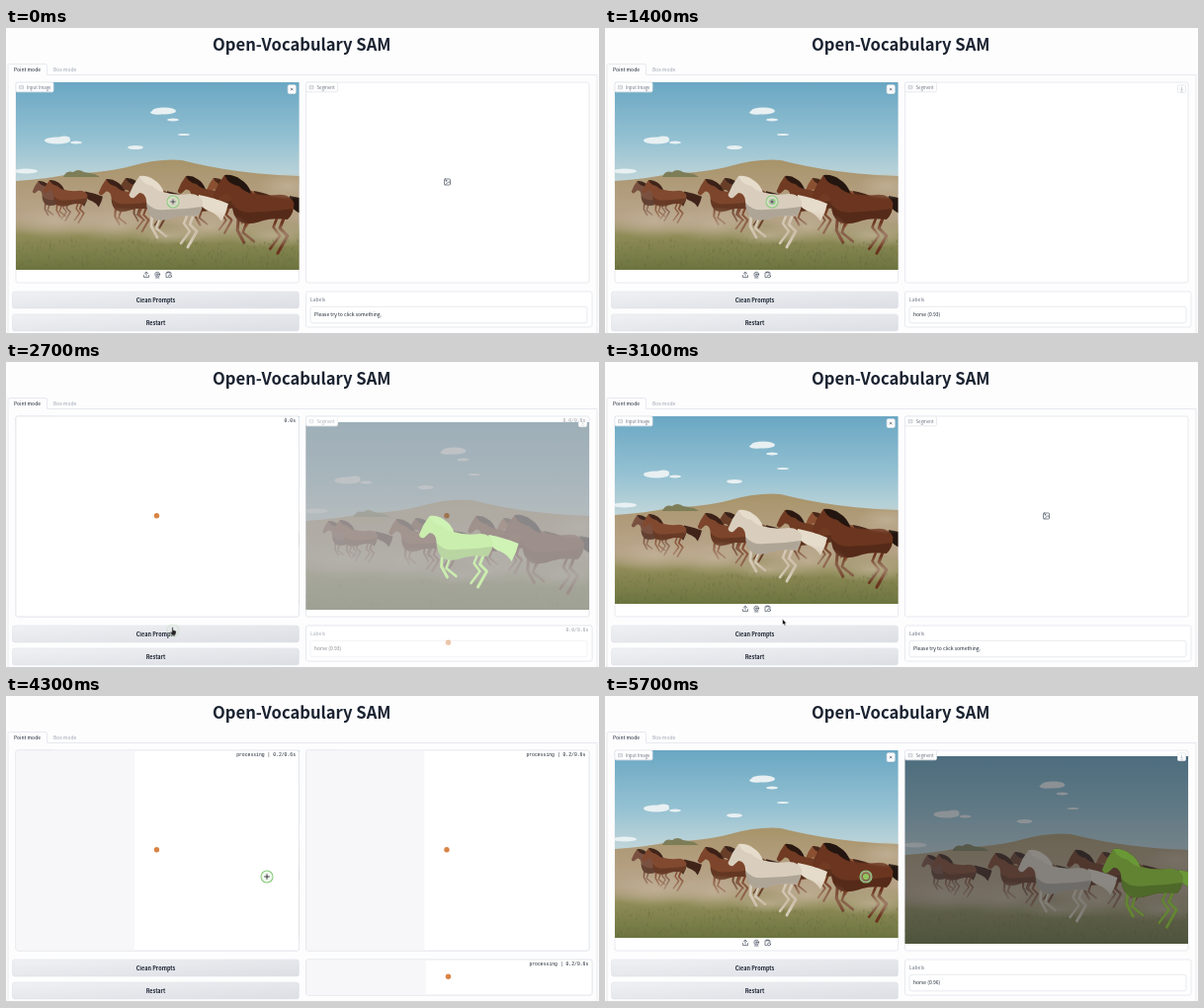
An HTML page for the animation above (5800 ms loop, 600 by 310 pixels).

```html
<!DOCTYPE html>
<html lang="en">
<head>
<meta charset="utf-8">
<title>Open-Vocabulary SAM</title>
<style>
  html, body { margin: 0; width: 100%; height: 100%; overflow: hidden; background: #fdfdfe; }
  svg { display: block; }
  text { font: 5px "Noto Sans CJK JP", "Noto Sans CJK SC", "Open Sans", sans-serif; fill: #1a2230; }
  .title { font-size: 16.6px; font-weight: 700; text-anchor: middle; }
  .button { font-size: 5.5px; font-weight: 600; text-anchor: middle; }
  .chip { font-size: 4.4px; fill: #6b7280; }
  .muted { fill: #9ca3af; }
  .timer { font: 4.76px "Liberation Mono", "DejaVu Sans Mono", monospace; text-anchor: end; }
  .box { fill: #fff; stroke: #e3e5ea; stroke-width: .8; }
  .icon { fill: none; stroke: #4b5563; stroke-width: .7; stroke-linecap: round; stroke-linejoin: round; }
  .pale { stroke: #a3a8b2; stroke-width: .5; }
  .limb { fill: none; stroke: currentColor; stroke-linecap: round; stroke-linejoin: round; }
  #label { font-weight: 500; }
  #clouds { filter: blur(.7px); }
</style>
</head>
<body>
<svg id="stage" width="600" height="310" viewBox="0 0 600 310">
  <defs>
    <linearGradient id="sky" x2="0" y2="1">
      <stop stop-color="#6aa7c3"/><stop offset=".55" stop-color="#94c1d2"/><stop offset="1" stop-color="#c6d8da"/>
    </linearGradient>
    <linearGradient id="hill" x2="0" y2="1">
      <stop stop-color="#a8946a"/><stop offset=".4" stop-color="#b5a184"/><stop offset="1" stop-color="#b8a68f"/>
    </linearGradient>
    <linearGradient id="grass" x2="0" y2="1">
      <stop stop-color="#aa9d78" stop-opacity="0"/><stop offset=".35" stop-color="#908c58"/>
      <stop offset="1" stop-color="#6c743e"/>
    </linearGradient>
    <linearGradient id="face" x2="1" y2="1">
      <stop stop-color="#f0f1f4"/><stop offset="1" stop-color="#dcdee4"/>
    </linearGradient>
    <radialGradient id="dust">
      <stop stop-color="#c4b39b" stop-opacity=".75"/><stop offset="1" stop-color="#c4b39b" stop-opacity="0"/>
    </radialGradient>
    <clipPath id="frame"><rect x="10" y="55" width="286.5" height="190"/></clipPath>

    <g id="horse">
      <path d="M195 169Q211 172 225 178Q223 187 218 196Q214 189 207 186Q200 184 195 177Z" fill="var(--mane)"/>
      <path class="limb" stroke-width="2.8" d="M148 189L147 201L153 212M191 186L186 199L193 206L184 222"/>
      <path class="limb" stroke-width="2.3" d="M156 191L152 203L162 211M184 188L180 198L186 206L177 218"/>
      <path fill="currentColor" d="M124.5 169L129 159L135 150L139 153Q152 157 158 166Q172 170 186 168Q196 168 199 176Q199 186 193 191Q180 189 170 192Q157 197 149 193Q142 188 142 175Q141 167 135 167L129.5 172Q126 173 124.5 169Z"/>
      <path opacity=".2" d="M142 177Q150 186 162 184Q180 184 198 181Q198 187 193 191Q180 189 170 192Q157 197 149 193Q142 188 142 177Z"/>
      <path fill="var(--mane)" d="M135 150Q143 149 150 154Q157 158 160 167Q153 165 148 160Q142 159 138 155Z"/>
    </g>

    <g id="photo" clip-path="url(#frame)">
      <rect x="10" y="55" width="287" height="105" fill="url(#sky)"/>
      <g id="clouds" fill="#e8f0f2"></g>
      <path d="M10 155Q42 153 64 148Q104 146 126 140Q155 132 178 134Q205 141 235 145T297 150V245H10Z" fill="url(#hill)"/>
      <path d="M58 151Q61 144 68 146Q73 142 79 146L90 148L95 151Z" fill="#7d7d58"/>
      <rect x="10" y="190" width="287" height="55" fill="url(#grass)"/>
      <g id="herd"></g>
      <g id="dusts" fill="url(#dust)"></g>
      <path id="blades" fill="none" stroke="#565f33" stroke-width=".6" opacity=".4"/>
    </g>
  </defs>

  <rect width="600" height="310" fill="#fdfdfe"/>
  <text class="title" x="299.3" y="22.5">Open-Vocabulary SAM</text>
  <path d="M2 310V38Q2 36.5 3.5 36.5H40Q41.5 36.5 41.5 38V47.5H598V310" fill="none" stroke="#e3e5ea" stroke-width=".8"/>
  <text x="8" y="43.6">Point mode</text>
  <text class="muted" x="48" y="43.6">Box mode</text>

  <!-- input panel -->
  <rect class="box" x="10" y="55" width="286.5" height="203" rx="2"/>
  <use href="#photo"/>
  <circle id="dot" r="3.1"/>
  <g class="icon">
    <path d="M139.5 250.5V252.5H144.5V250.5M142 251V247.3M140.4 248.8L142 247.2L143.6 248.8"/>
    <circle cx="153.2" cy="249.6" r="2.4"/><circle cx="153.2" cy="249.6" r=".9"/><path d="M151.5 253H155"/>
    <path d="M164 252.6H162V247.8H167V249.4M163.4 247.8V247H165.6V247.8"/><circle cx="166" cy="251.4" r="1.5"/>
  </g>
  <rect class="box" x="285.2" y="57.8" width="8" height="8.6" rx="1.3"/>
  <path class="icon" stroke-width=".5" d="M288.2 61.1L290.2 63.1M290.2 61.1L288.2 63.1"/>
  <g id="inputChip"></g>

  <!-- segment panel -->
  <rect class="box" x="303.5" y="55" width="286.5" height="203" rx="2"/>
  <g id="empty" class="icon">
    <rect x="443.5" y="153" width="6" height="6" rx=".8"/><circle cx="445.3" cy="154.8" r=".5"/>
    <path d="M444.5 158.8L448 155.7L449.4 157"/>
  </g>
  <g id="result" transform="translate(293.5 6)">
    <use href="#photo"/>
    <rect x="10" y="55" width="286.5" height="190" fill="#30343a" opacity=".5"/>
    <g id="masks" clip-path="url(#frame)"></g>
  </g>
  <g id="segmentChip"></g>
  <g id="download">
    <rect class="box" x="579.5" y="57.8" width="8" height="7.8" rx="1.3"/>
    <path class="icon pale" d="M583.5 60V62.8M582.5 62L583.5 63L584.5 62M582.2 64.2H584.8"/>
  </g>

  <!-- labels -->
  <rect class="box" x="303.5" y="267" width="289.5" height="36" rx="2"/>
  <text class="chip" x="308" y="277.2" style="font-size:5px">Labels</text>
  <rect class="box" x="308" y="282.3" width="280" height="16.5" rx="2"/>
  <text id="label" x="312" y="292.3"></text>

  <g id="covers"></g>

  <g fill="url(#face)" stroke="#e0e2e7" stroke-width=".6">
    <rect x="6.5" y="267" width="290" height="17" rx="2.6"/>
    <rect x="6.5" y="290" width="290" height="17" rx="2.6"/>
  </g>
  <text class="button" x="151.5" y="277.8">Clean Prompts</text>
  <text class="button" x="151.5" y="300.8">Restart</text>
  <rect y="309" width="600" height="1" fill="#d2d3d6"/>

  <g id="cursor">
    <g id="ring">
      <circle r="6" fill="#c9edc2" fill-opacity=".25" stroke="#8ccb80" stroke-width="1.1"/>
      <circle r="4.9" fill="none" stroke="#e4f6df" stroke-opacity=".6" stroke-width=".7"/>
    </g>
    <g id="cross" fill="none">
      <path d="M-3 0H3M0 -3V3" stroke="#fff" stroke-width="2"/>
      <path d="M-2.8 0H2.8M0 -2.8V2.8" stroke="#222" stroke-width=".9"/>
    </g>
    <path id="arrow" d="M-.8 -1V5L.6 3.8L1.6 6L2.6 5.5L1.7 3.4H3.4Z" fill="#111" stroke="#fff" stroke-width=".5"/>
    <path id="hand" d="M-1.2 -3Q-.4 -3.8 .2 -3V-.5L3 .3Q3.6 .8 3 3L2.3 5H-.9L-3 1.8Q-2.8 .8 -1.2 1.8Z" fill="#222" stroke="#fff" stroke-width=".5"/>
  </g>
</svg>

<script>
const LOOP = 5800;
const $ = id => document.getElementById(id);
const clamp = v => Math.max(0, Math.min(1, v));
const ramp = (t, a, b) => clamp((t - a) / (b - a));
const ease = p => p * p * (3 - 2 * p);
const within = (t, a, b) => t >= a && t < b;
const show = (id, amount) => $(id).setAttribute("opacity", +amount);

// Static scenery
const horse = ([x, y, size, coat, mane]) =>
  `<use href="#horse" style="color:${coat};--mane:${mane}"
    transform="translate(${x} ${y}) scale(${size}) translate(-125 -150)"/>`;
const ellipses = list => list.map(([x, y, rx, ry]) =>
  `<ellipse cx="${x}" cy="${y}" rx="${rx}" ry="${ry}"/>`).join("");

const white = [125, 150, 1], front = [210, 149, 1.1];
$("herd").innerHTML = [
  [27, 155, .56, "#7a5140", "#3e271d"], [38, 154, .6, "#81492f", "#40241a"],
  [114, 152, .7, "#683e29", "#38231a"], [94, 153, .74, "#7d452b", "#3b2117"],
  [203, 152, .68, "#8a5031", "#472719"], [174, 150, .8, "#703b22", "#2b1811"],
  [...white, "#d9cebd", "#e6dccb"], [...front, "#6b351f", "#23150f"]
].map(horse).join("");
$("masks").innerHTML = horse([...white, "#9fe06a", "#a9e878"]) + horse([...front, "#648c33", "#72a53a"]);
const [whiteMask, frontMask] = $("masks").children;

$("clouds").innerHTML = ellipses([
  [160, 84, 12, 3.6], [153, 85.5, 7, 2.2], [169, 93, 6, 1.5], [52, 114, 13, 3.4], [59, 112, 6, 2.6],
  [71, 116, 6, 1.5], [131, 121, 8, 2], [180, 108, 6, 1], [20, 145, 12, 2.4]
]);
$("dusts").innerHTML = ellipses([
  [50, 196, 48, 18], [110, 199, 48, 18], [205, 202, 42, 17], [165, 210, 40, 10], [270, 210, 50, 13], [285, 160, 30, 14]
]);
let seed = 7, blades = "";
const random = () => (seed = seed * 16807 % 2147483647) / 2147483647;
for (let i = 0; i < 260; i++)
  blades += `M${10 + 287 * random()} ${216 + 28 * random()}l${random() * 2 - 1} -3`;
$("blades").setAttribute("d", blades);

const chip = (id, x, width, name) => $(id).innerHTML =
  `<rect class="box" x="${x}" y="55" width="${width}" height="9.8" rx="1.5"/>
   <path class="icon pale" d="M${x + 4} 58.4h3.4v3.4h-3.4zM${x + 4} 60h3.4"/>
   <text class="chip" x="${x + 10.9}" y="61.6">${name}</text>`;
chip("inputChip", 10, 38, "Input Image");
chip("segmentChip", 303.5, 32, "Segment");

// Loading covers: x, y, width, height, right edge of the timer
const covers = [[10, 55, 286.5, 203, 293], [303.5, 55, 286.5, 203, 586.3], [303.5, 267, 289.5, 36, 589.3]]
  .map(([x, y, w, h, end]) => {
    const g = document.createElementNS("http://www.w3.org/2000/svg", "g");
    g.innerHTML = `<rect class="box" x="${x}" y="${y}" width="${w}" height="${h}" rx="2"/>
      <rect x="${x + .4}" y="${y + .4}" height="${h - .8}" fill="#f7f6f8"/>
      <circle cx="${x + w / 2 - .8}" cy="${y + h / 2 - .8}" r="2.7" fill="#d98445"/>
      <text class="timer" x="${end}" y="${y + 6.4}"></text>`;
    $("covers").append(g);
    return { g, bar: g.children[1], text: g.children[3], w: w - .8 };
  });

const runs = [
  { start: 400, end: 1200, eta: .5, status: "processing | " },
  { start: 2620, end: 3050, eta: .6, status: "", clean: true },
  { start: 4050, end: 4700, eta: .6, status: "processing | " }
];

function drawCovers(t) {
  const run = runs.find(r => within(t, r.start, r.end + 170));
  covers.forEach(({ g, bar, text, w }, i) => {
    let alpha = 0;
    if (run) {
      const { start, end, eta, status, clean } = run;
      const spent = (Math.min(t, end) - start) / 1000;
      const cleared = clean && i === 0;
      const enter = cleared ? 1 : ramp(t, start, start + (clean ? 180 : 150));
      const leave = i === 0 || clean ? +(t >= end) : ramp(t, end, end + 170);
      alpha = enter * (1 - leave);
      bar.setAttribute("width", clean ? 0 : w * clamp(spent / eta));
      const clock = Math.floor(spent * 10 + .001) / 10;
      text.textContent = status + clock.toFixed(1) + (cleared ? "s" : `/${eta}s`);
    }
    g.setAttribute("opacity", alpha);
  });
}

// Pointer stops: time, x, y
const stops = [[0, 169, 176], [1600, 169, 176], [2100, 169, 264], [2500, 169, 272],
  [2950, 169, 272], [3650, 264, 183], [LOOP, 264, 183]];

function drawCursor(t) {
  const i = stops.findIndex(s => s[0] > t);
  const [t0, x0, y0] = stops[i - 1], [t1, x1, y1] = stops[i];
  const p = ease(ramp(t, t0, t1)), y = y0 + (y1 - y0) * p;
  $("cursor").setAttribute("transform", `translate(${x0 + (x1 - x0) * p} ${y})`);
  show("ring", t < 3500 ? 1 - ramp(t, 2450, 2780) : ramp(t, 3950, 4100));
  show("cross", y < 244 && !within(t, 5000, LOOP));
  show("arrow", within(y, 244, 267));
  show("hand", y >= 267);
}

function draw(now) {
  const t = now % LOOP;
  const first = within(t, 1200, 3000), second = t >= 4700;
  show("empty", !first && !second);
  show("download", first || second);
  show("result", within(t, 1450, 3000) || t >= 5000);
  whiteMask.setAttribute("opacity", first ? 1 : 0);
  frontMask.setAttribute("opacity", second ? .9 : 0);
  $("label").textContent = first ? "horse (0.93)" : second ? "horse (0.96)" : "Please try to click something.";
  show("dot", within(t, 1200, 2600) || t >= 5000);
  $("dot").setAttribute("transform", second ? "translate(264 183)" : "translate(169.5 176)");
  $("dot").setAttribute("fill", second ? "#7fb83c" : "#62cf55");
  drawCovers(t);
  drawCursor(t);
}

const begin = performance.now();
function tick() {
  draw(performance.now() - begin);
  requestAnimationFrame(tick);
}
tick();
</script>
</body>
</html>
```
